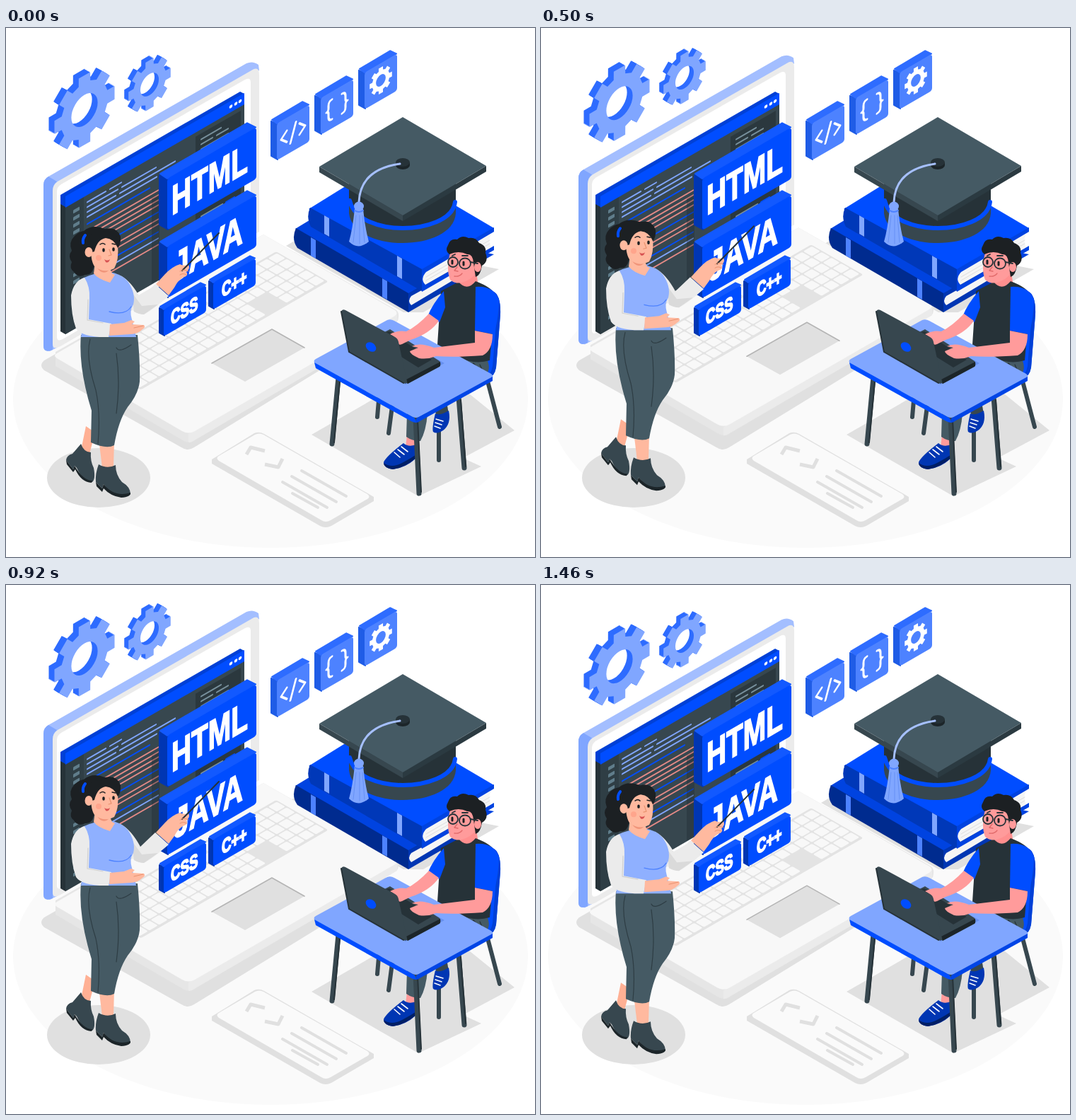
Recreate the animation shown at these times as an HTML page. Size 748x748 px, loop 1.5 s.

```html
<!DOCTYPE html>
<html lang="en">
<head>
<meta charset="utf-8">
<title>Programming lesson</title>
<style>
html, body { margin: 0; width: 100%; height: 100%; overflow: hidden; background: #fff }
svg { display: block; width: 100vw; height: 100vh }
text { font-family: "Liberation Sans", Arial, sans-serif; font-weight: bold; fill: #fff; stroke: #fff; stroke-width: 2 }
.line { fill: none; stroke-linecap: round; stroke-linejoin: round }
.soft { stroke-linejoin: round }
</style>
</head>
<body>
<svg viewBox="0 0 748 748">
<ellipse cx="374" cy="525" rx="364" ry="210" fill="#fafafa"/>

<!-- floor shadows -->
<g fill="#e0e0e0" class="soft">
  <path d="M54 470 346 305 548 420 266 593Q257 599 248 593L54 484Q46 477 54 470Z"/>
  <ellipse cx="131" cy="636" rx="73" ry="42"/>
  <path d="M432 575 545 510 640 505 719 569 646 608 672 620 583 662Z"/>
  <path d="M396 308 430 288 697 341 590 402 562 402Z"/>
</g>

<!-- big laptop and gears -->
<g class="float">
  <g id="gears"></g>
  <path d="M70 458 364 292 552 399Q557 403 554 414L266 583Q258 588 250 583L70 478Z" fill="#e6e6e6"/>
  <path d="M258 574V586Q263 586 268 582L553 416V403Z" fill="#ebebeb"/>
  <path d="M72 460 364 292 550 399Q555 403 550 407L267 570Q258 575 249 570L72 467Q66 463 72 460Z" fill="#f8f8f8"/>
  <path d="M53 222Q53 214 60 210L340 50Q349 46 357 52L358 60 72 226V452L62 457Q53 457 53 450Z" fill="#a3beff"/>
  <path d="M53 222Q53 214 60 210L72 217Q66 222 66 230V455Q53 460 53 450Z" fill="#80a6ff"/>
  <path d="M66 230Q66 222 73 217L347 60Q358 53 358 66V288L77 450Q66 456 66 447Z" fill="#ebebeb"/>
  <path d="M72 231Q72 225 78 221L338 73Q346 69 346 77V286L80 440Q72 444 72 437Z" fill="#fff"/>
  <g id="keys" transform="matrix(.866 .5 -.866 .5 382 318)"></g>
  <path d="M376 426 422 452 338 500 291 474Z" fill="#e0e0e0"/>
  <path d="M291 474 376 426 422 452" class="line" stroke="#b5b5b5" stroke-width="1.6"/>
</g>

<!-- code window -->
<path d="M77 237 84 240V433L77 429Z" fill="#263238"/>
<path d="M77 236 331 90 337 93 84 240V253L77 249Z" fill="#0040d6"/>
<g id="code" transform="matrix(1 -.577 0 1 84 238)"></g>
<g id="tiles"></g>

<!-- pictograms -->
<g class="line" stroke="#fff" stroke-width="3">
  <path transform="matrix(1 -.577 0 1 406 148)" d="M-9-8-17 0-9 8M9-8 17 0 9 8M4-13-4 13"/>
  <path transform="matrix(1 -.577 0 1 468 111)" d="M-7-14Q-12-14-12-8V-4Q-12 0-15 0-12 0-12 4V8Q-12 14-7 14M7-14Q12-14 12-8V-4Q12 0 15 0 12 0 12 4V8Q12 14 7 14"/>
</g>
<g id="cog"></g>

<!-- books -->
<g class="soft">
  <path d="M409 284 432 270 690 320 570 389Z" fill="#0043e0"/>
  <path d="M410 283 569 375V402L412 311Q403 298 410 283Z" fill="#002b8f"/>
  <path d="M569 375 645 332V358L569 402Z" fill="#0036b3"/>
  <path d="M573 379 640 342V352L573 392Q567 386 573 379Z" fill="#f5f5f5"/>
  <path d="M431 296 438 300V326L431 322ZM532 354 539 358V384L532 380Z" fill="#4d82ff"/>
  <path d="M428 256 486 220 600 230 690 283 588 343Z" fill="#004dff"/>
  <path d="M430 254 588 341V372L431 281Q424 267 430 254Z" fill="#0038b8"/>
  <path d="M588 341 690 282V288L594 345V363L690 308V314L588 373Z" fill="#0043e0"/>
  <path d="M594 345 686 291Q681 300 686 310L593 363Q585 355 594 345Z" fill="#f5f5f5"/>
  <path d="M594 352 684 300M594 357 684 305" class="line" stroke="#dedede" stroke-width="1"/>
  <path d="M450 265 457 269V295L450 291ZM553 322 560 326V355L553 351Z" fill="#80a6ff"/>
</g>

<!-- graduation cap -->
<path d="M485 215V262C488 290 525 304 561 304S634 290 636 262V215Z" fill="#37474f"/>
<path d="M485 215V246C492 276 530 285 561 285S632 274 636 248V215Z" fill="#263238"/>
<path d="M486 244C492 272 530 283 561 283S632 272 635 246" class="line" stroke="#004dff" stroke-width="6"/>
<path d="M443 196 561 265V273L443 204Z" fill="#37474f"/>
<path d="M561 265 679 195V203L561 273Z" fill="#2b3a41"/>
<path d="M443 196 561 126 679 195 561 265Z" fill="#455a64"/>
<path d="M551 190V194A10 6 0 0 0 571 194V190Z" fill="#1c2529"/>
<ellipse cx="561" cy="190" rx="10" ry="6" fill="#263238"/>
<path d="M557 192Q501 200 499 246" class="line" stroke="#a6c0ff" stroke-width="3"/>
<path d="M493 256Q490 285 485 302 498 315 513 302 507 280 505 256Z" fill="#80a6ff"/>
<path d="M495 265 491 303M500 265V305M504 265 507 303" class="line" stroke="#6691f5" stroke-width="1"/>
<ellipse cx="499" cy="252" rx="7" ry="6.5" fill="#80a6ff"/>
<path d="M493 258Q499 262 505 258" class="line" stroke="#4d82ff" stroke-width="2"/>

<!-- slab on the floor -->
<path d="M291 610 351 573Q358 570 365 574L520 663V669L460 704Q452 708 444 704L291 616Z" fill="#e0e0e0"/>
<path d="M301 605 352 575Q358 572 364 575L511 659Q516 663 511 666L459 696Q452 700 446 696L301 612Q296 608 301 605Z" fill="#fafafa"/>
<g class="line" stroke="#e0e0e0" stroke-width="5">
  <path d="M340 603 346 593 366 598M366 617 385 621 391 609" stroke-linecap="butt"/>
  <path d="M418 626 481 662M404 634 467 670M391 642 454 678M405 658 441 678" stroke-width="4"/>
</g>

<!-- student, chair and desk -->
<g class="line" stroke="#37474f" stroke-width="6">
  <path d="M528 515 525 550M546 535 541 573M612 560V611M679 492 698 564"/>
</g>
<path d="M688 372Q700 377 699 405L693 480Q691 492 681 497L640 520 580 486 650 440Z" fill="#004dff"/>
<path d="M688 372Q694 376 694 405L688 478Q686 490 677 495L640 514V520L681 497Q691 492 693 480L699 405Q700 377 688 372Z" fill="#0040d6"/>
<path d="M606 540 623 528 627 552 612 556Z" fill="#37474f"/>
<path d="M607 545Q613 549 626 541 630 560 618 569 609 575 604 571 602 566 607 545Z" fill="#0036b3"/>
<path d="M608 553 618 556M607 558 616 561M606 563 614 566" class="line" stroke="#fff" stroke-width="1.5"/>
<path d="M567 575 583 574 580 596 565 593Z" fill="#ff9b9b"/>
<path d="M567 545H596Q594 570 586 584 574 584 566 578Z" fill="#455a64"/>
<path d="M562 587Q570 594 582 588 586 601 579 609 565 622 547 624 534 622 534 614 537 606 562 587Z" fill="#0036b3"/>
<path d="M534 615Q545 623 560 615T583 601V605Q565 622 547 624 534 622 534 615Z" fill="#001f66"/>
<path d="M559 592 568 599M554 596 563 603M549 600 557 607" class="line" stroke="#fff" stroke-width="1.6"/>
<path d="M620 465 680 468Q686 482 679 490L640 498 590 480Z" fill="#455a64"/>
<path d="M656 480 661 474 670 485M670 476 674 485" class="line" stroke="#263238" stroke-width="1.2"/>
<path d="M637 347 664 338 668 366 650 377 637 366Z" fill="#ff8f8f"/>
<path d="M615 372Q636 361 640 359 652 373 664 358 688 367 692 378L684 470Q650 480 610 448Z" fill="#263238"/>
<g class="line" stroke-width="7" stroke="#37474f">
  <path d="M470 494 461 588M640 522 648 622M579 550 584 658"/>
  <path d="M472 500 464 586M643 526 650 620M582 554 587 656" stroke="#263238" stroke-width="2"/>
</g>
<path d="M438 468 539 413Q544 411 549 414L686 489Q691 493 686 496L584 550Q580 552 575 550L438 475Q433 471 438 468Z" fill="#80a6ff"/>
<path d="M436 473 575 550Q580 552 580 558 577 558 573 556L438 481Z" fill="#004dff"/>
<path d="M580 552 688 493V499L585 556Q583 558 580 558Z" fill="#0045e6"/>
<path d="M485 459 565 504 620 474 540 430Z" fill="#6690f0"/>
<path d="M486 455 543 426 613 471Q616 475 613 479L568 503Z" fill="#37474f"/>
<path d="M514 437 542 429 602 469 583 480Z" fill="#263238"/>
<path d="M566 497 614 472V478L568 503Z" fill="#1c2529"/>
<path d="M619 372Q603 390 596 408L613 416 621 395Z" fill="#004dff"/>
<path d="M598 404Q581 422 566 429 553 427 543 433 551 437 554 442 554 450 560 447L572 441Q600 432 612 414Z" fill="#ff9b9b"/>
<path d="M664 366Q690 364 697 385 696 418 689 433L663 428Z" fill="#004dff"/>
<path d="M663 428 688 433Q688 456 674 463 635 466 608 464 596 469 584 467 571 461 571 457L583 452 574 450Q585 444 605 452L663 445Z" fill="#ff9b9b"/>
<path d="M474 401Q475 397 480 399L550 437Q554 439 555 444L567 500Q567 504 562 502L485 458Z" fill="#37474f"/>
<path d="M474 401 485 458 562 502" class="line" stroke="#263238" stroke-width="2"/>
<ellipse cx="516" cy="451" rx="8" ry="6" transform="rotate(38 516 451)" fill="#004dff"/>
<path d="M628 318Q622 341 628 356 637 364 650 358 664 352 670 338L668 312Z" fill="#ff9b9b"/>
<path d="M627 320Q620 315 625 307 628 297 638 299 645 292 654 297 664 295 669 304 680 308 678 318 683 330 673 336 671 350 664 352L661 332Q660 319 652 320 640 314 627 320Z" fill="#1c2023"/>
<ellipse cx="667" cy="338" rx="5" ry="7" fill="#ff9b9b"/>
<g class="line" stroke="#263238" stroke-width="1.8">
  <ellipse cx="632" cy="331" rx="7" ry="7"/><ellipse cx="649" cy="333" rx="8" ry="7.5"/>
  <path d="M657 331 667 333M631 322 635 320M645 322 653 322"/>
  <path d="M638 338 634 343 639 344M634 351Q641 352 645 347" stroke="#e06a6a" stroke-width="1.3"/>
</g>
<path d="M631 329V333M647 331V335" class="line" stroke="#1c2023" stroke-width="3"/>

<!-- teacher -->
<g class="float">
  <path d="M110 287Q122 277 140 284 157 280 162 295 163 306 157 313L124 338Q122 350 112 349 102 354 96 345 89 340 93 331 87 322 93 315 88 303 97 294 103 288 110 287Z" fill="#1c2023"/>
  <path d="M113 563 126 572 118 602 106 597Z" fill="#ffb094"/>
  <path d="M131 580 153 584 152 622 136 622Z" fill="#ffb99f"/>
  <path d="M106 588Q110 600 120 600 119 612 124 622 127 638 122 642 109 642 100 622L97 619 95 624 85 611Q86 604 94 602Z" fill="#37474f"/>
  <path d="M131 617Q143 624 155 618 155 632 164 642 176 649 176 659 165 667 148 658L138 645 136 651 127 642Q126 630 131 617Z" fill="#37474f"/>
  <path d="M85 611 95 624 97 619Q109 640 122 640L121 643Q106 642 98 624L95 628 86 617ZM127 642 136 651 138 645Q153 664 176 657 177 663 163 664 148 662 138 651L136 656 128 648Z" fill="#1c2529"/>
  <path d="M106 434H186Q190 475 189 500 187 518 172 536 159 555 153 590 142 596 120 586L121 541Q102 480 106 434Z" fill="#455a64"/>
  <path d="M119 440Q112 465 127 512 134 545 130 588M177 448Q160 460 156 452M156 460Q162 500 156 545" class="line" stroke="#2e3d44" stroke-width="1.2"/>
  <path d="M162 350Q177 358 190 382L211 362 230 379Q207 399 195 405 184 404 174 395Z" fill="#ebebeb"/>
  <path d="M178 374 181 401Q188 405 195 405L215 391 192 393Z" fill="#dadada"/>
  <path d="M212 362 224 349Q235 337 246 334 250 337 258 335 261 340 255 345 259 350 250 353 243 357 238 367L230 378Z" fill="#ffb99f"/>
  <path d="M249 343 258 334 301 290" class="line" stroke="#263238" stroke-width="2"/>
  <path d="M246 344Q250 340 258 344M246 349Q251 346 255 349" class="line" stroke="#e8926f" stroke-width="1"/>
  <path d="M108 354Q124 346 145 345 163 347 172 358 184 375 180 391 174 400 178 412L184 437H106Q112 410 106 390Z" fill="#8fb0ff"/>
  <path d="M146 401Q169 407 177 394" class="line" stroke="#4d82ff" stroke-width="1.3"/>
  <path d="M126 332 146 338 150 347 154 349 147 360Q130 355 124 347Z" fill="#ffb99f"/>
  <path d="M128 338 147 341Q137 352 128 338Z" fill="#f0957a"/>
  <path d="M111 353Q96 357 92 378 92 406 99 425 108 438 145 437L149 418 117 412 118 382Q119 366 111 353Z" fill="#ebebeb"/>
  <path d="M116 384 115 413 137 417" class="line" stroke="#d0d0d0" stroke-width="1.2"/>
  <path d="M147 419 167 417 177 413 182 415 178 419 195 420Q198 423 193 426 186 433 176 433L146 435Z" fill="#ffb99f"/>
  <path d="M181 424 194 421" class="line" stroke="#e8926f" stroke-width="1"/>
  <path d="M121 300Q118 326 125 337 139 348 153 340 160 328 158 306L147 289Z" fill="#ffb99f"/>
  <path d="M119 318Q111 307 118 296 121 286 133 289 146 284 156 294 163 302 158 311 153 298 141 297 129 299 125 316Z" fill="#1c2023"/>
  <path d="M109 304Q108 298 112 293" class="line" stroke="#004dff" stroke-width="4"/>
  <ellipse cx="117" cy="317" rx="5.5" ry="7" fill="#ffb99f"/>
  <path d="M138 313V315M152 312V314" class="line" stroke="#1c2023" stroke-width="3.4"/>
  <path d="M133 306Q137 303 140 306M150 305 155 306" class="line" stroke="#1c2023" stroke-width="1.5"/>
  <path d="M146 313 149 321 145 322" class="line" stroke="#e8926f" stroke-width="1.2"/>
  <path d="M139 327Q143 330 147 327 145 333 141 331Z" fill="#d85252"/>
  <circle cx="131" cy="325" r="4" fill="#ffa58c"/>
</g>
</svg>
<script>
const SLOPE = .577, BLUE = '#004dff', LIGHT = '#80a6ff';
const fill = (id, markup) => document.getElementById(id).innerHTML = markup;
const rect = (x, y, w, h, color, r = 0) => `<rect x="${x}" y="${y}" width="${w}" height="${h}" rx="${r}" fill="${color}"/>`;
const wall = (x, y, content) => `<g transform="matrix(1 -${SLOPE} 0 1 ${x} ${y})">${content}</g>`;

// Upright slab: (x, y) is the top left corner of its front face
function slab(x, y, w, h, depth, [front, side, top]) {
  const d = depth * SLOPE, rise = w * SLOPE;
  const face = (color, path) => `<path d="${path}Z" fill="${color}" stroke="${color}" stroke-width="2" stroke-linejoin="round"/>`;
  return face(side, `M${x - depth + 1} ${y - d + 2}L${x + 1} ${y + 1}v${h - 2}l${-depth} ${-d}`) +
    face(top, `M${x - depth + 2} ${y - d}l${w - 3} ${-rise + 1}L${x + w - 1} ${y - rise}L${x} ${y}`) +
    wall(x, y, rect(0, 0, w, h, front, 4));
}

function label(x, y, size, word) {
  return `<text transform="matrix(.67 -.387 0 1 ${x} ${y})" font-size="${size}">${word}</text>`;
}

// Toothed wheel with a round hole, drawn on the wall plane
function wheel(x, y, r, color) {
  const points = [];
  for (let tooth = 0; tooth < 8; tooth++)
    for (const [turn, k] of [[-.25, .77], [-.19, 1], [.19, 1], [.25, .77]]) {
      const a = tooth * Math.PI / 4 + turn;
      points.push(`${(r * k * Math.cos(a)).toFixed(1)} ${(r * k * Math.sin(a)).toFixed(1)}`);
    }
  const hole = r * .43;
  return `<path transform="matrix(.866 -.5 0 1 ${x} ${y})" fill="${color}" fill-rule="evenodd"
    d="M${points.join('L')}ZM${-hole} 0a${hole} ${hole} 0 1 0 ${2 * hole} 0a${hole} ${hole} 0 1 0 ${-2 * hole} 0Z"/>`;
}

function gear(x, y, r, depth) {
  let out = '';
  for (let d = depth; d > 0; d--) out += wheel(x - d, y - d * SLOPE, r, '#2e6cff');
  return out + wheel(x, y, r, LIGHT);
}

fill('gears', gear(111, 116, 50, 8) + gear(203, 80, 35, 6));
fill('cog', wheel(530, 74, 18.5, '#fff'));

let keys = rect(-2, -2, 85, 306, '#e3e3e3', 3);
for (let row = 0; row < 5; row++)
  for (let col = 0; col < 19; col++)
    if (row < 3 || col < 4 || col > 5) keys += rect(row * 16 + 1, col * 16, 14, 14, '#f8f8f8', 2);
fill('keys', keys);

const palette = [BLUE, '#0036b3', '#1259ff'], pale = ['#4d82ff', '#1f5ce6', '#2e6cff'];
fill('tiles',
  slab(228, 213, 126, 73, 12, palette) + label(234, 265, 58, 'HTML') +
  slab(228, 309, 126, 73, 12, palette) + label(237, 360, 58, 'JAVA') +
  slab(223, 398, 60, 38, 7, palette) + label(233, 420, 28, 'CSS') +
  slab(293, 360, 60, 38, 7, palette) + label(305, 381, 28, 'C++') +
  [0, 1, 2].map(i => slab(383 + 62 * i, 135 - 36 * i, 46, 52, 9, pale)).join(''));

// Code rows: start, top, length, colour
const RED = '#e58a86', GREY = '#78909c', SKY = '#80a6ff';
const rows = [
  [30, 25, 28, SKY], [62, 25, 18, SKY], [30, 32, 45, SKY], [79, 32, 50, SKY], [30, 39, 42, SKY], [76, 39, 80, SKY],
  [30, 46, 100, SKY], [30, 56, 90, BLUE], [40, 66, 92, RED], [40, 73, 92, RED], [46, 80, 86, RED], [46, 87, 86, RED],
  [40, 97, 92, BLUE], [40, 107, 92, RED], [46, 114, 86, RED], [56, 125, 76, BLUE], [56, 134, 76, SKY], [60, 143, 72, RED],
  [191, 29, 30, GREY], [191, 36, 18, GREY], [213, 36, 18, GREY], [191, 43, 40, GREY], [191, 138, 32, GREY], [226, 138, 14, BLUE]];
let code = rect(0, 15, 253, 180, '#37474f') + rect(0, 15, 26, 180, '#2f3e45') + rect(184, 22, 64, 150, '#2b383e') +
  rect(0, 0, 253, 16, BLUE);
for (let i = 0; i < 16; i++) code += rect(11, 26 + i * 10, 9, 5, '#607d8b', 1);
for (const [x, y, w, color] of rows) code += rect(x, y, w, 2.2, color, 1);
code += rect(122, 74, 11, 120, 'rgba(30,40,48,.35)');
for (const x of [234, 241, 247]) code += `<circle cx="${x}" cy="8" r="2.3" fill="#fff"/>`;
fill('code', code);

// Linear rise and fall in 36 steps per loop
const LOOP = 1500, STEPS = 36, HEIGHT = 15, PEAK = 18.5;
const floats = document.querySelectorAll('.float');
function draw(now) {
  const step = Math.floor((now + 3) % LOOP / LOOP * STEPS);
  const lift = HEIGHT * (step < PEAK ? step / PEAK : (STEPS - step) / (STEPS - PEAK));
  for (const part of floats) part.setAttribute('transform', `translate(0 ${-lift})`);
  requestAnimationFrame(draw);
}
draw(performance.now());
</script>
</body>
</html>
```
